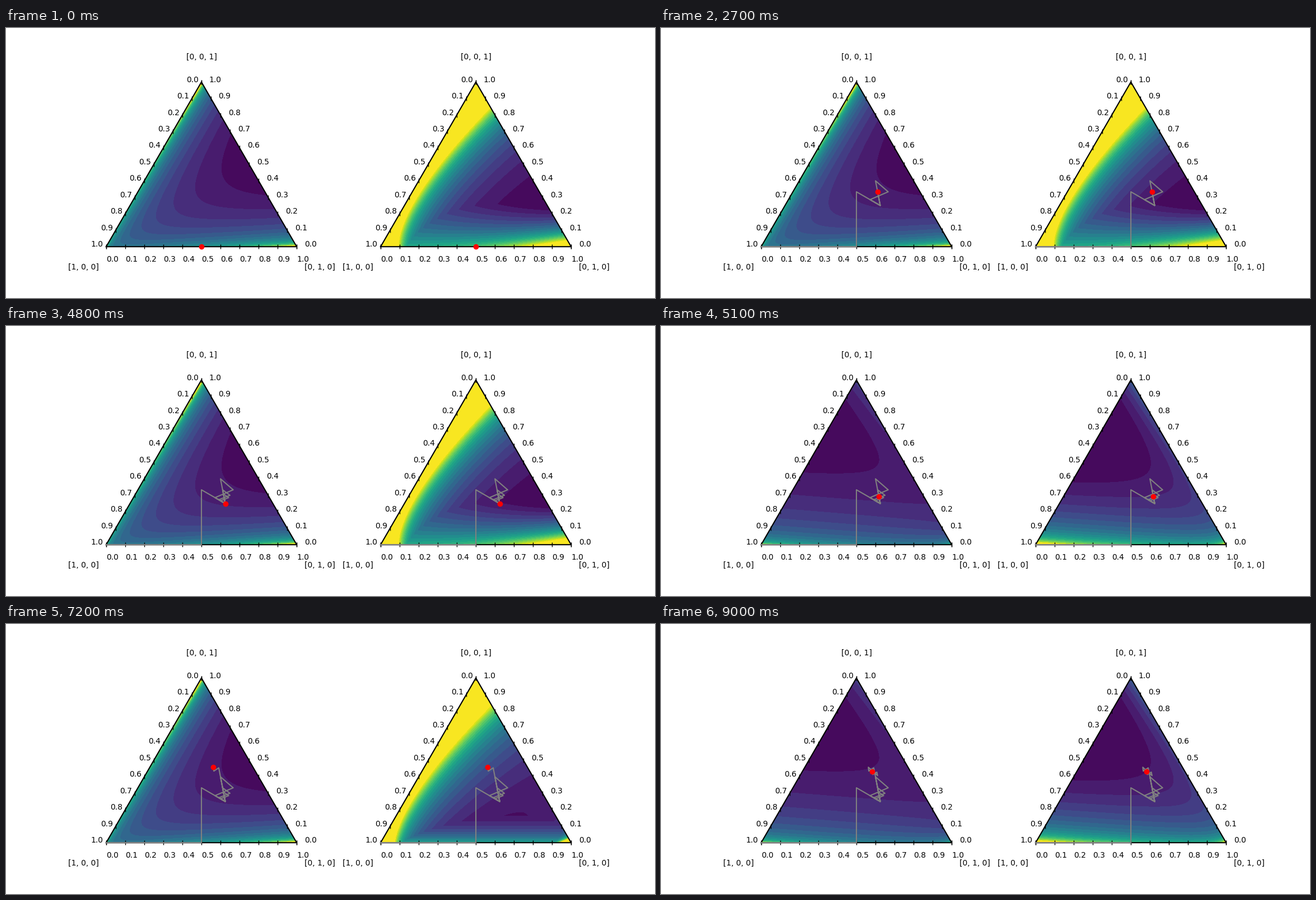
A matplotlib script that plays this animation: 1159x483 px, repeating every 9.3 s.

```python
import numpy as np
import matplotlib.pyplot as plt
from matplotlib.animation import FuncAnimation
from matplotlib.patches import Polygon

W, H, DPI = 1159, 483, 100
SIDE = 340.25
TOP, BASE = 96.6, 391.2
CENTERS = (349.0, 839.1)
STEPS = "ABCBCBABCBABCBABCCCCCCACBBBCAC"
N = len(STEPS) + 1
# Scene shown after each step, as runs of (scene, length).
RUNS = [(0, 14), (1, 1), (0, 2), (1, 7), (2, 2), (3, 1), (1, 4)]
SCENE_AT = [s for s, n in RUNS for _ in range(n)]

fig = plt.figure(figsize=(W / DPI, H / DPI), dpi=DPI, facecolor="white")
ax = fig.add_axes([0, 0, 1, 1])
ax.set_xlim(0, W)
ax.set_ylim(H, 0)
ax.axis("off")


def to_xy(w, cx):
    """Barycentric weights (a, b, c) to stage pixels."""
    w = np.asarray(w, float)
    x = cx + SIDE * (w[..., 1] + w[..., 2] / 2 - 0.5)
    y = BASE - (BASE - TOP) * w[..., 2]
    return x, y


# Averages of the vertices played so far, starting from an even A/B mix.
plays = np.eye(3)[["ABC".index(s) for s in STEPS]]
means = np.cumsum(plays, axis=0) / np.arange(1, N)[:, None]
path = np.vstack([[0.5, 0.5, 0], means])


# Scalar fields on the simplex, scaled so the colour range is 0 to 1.
def variance(w, num, den):
    """Linear form over the determinant of a weighted 2D design."""
    a, b, c = w
    top = num[0] * a + num[1] * b + num[2] * c
    ab, bc, ac, cc = den
    return (top + 1e-9) / (ab * a * b + bc * b * c + ac * a * c + cc * c * c + 1e-9)


def log_field(num, den, gain, shift):
    return lambda *w: gain * np.log(variance(w, num, den)) + shift


def max_field(num, shift, low):
    den = (0.35, 1, 0.22, 0)
    return lambda *w: np.maximum(0.2 * variance(w, num, den) + shift, low(*w))


def low_tilted(a, b, c):
    return 0.3 / (c + 0.2 * a + 0.12) - 0.63 * b - 0.345


def low_level(a, b, c):
    return 0.086 / (c + 0.1) - 0.28


edge_min = log_field((0.01, 1, 1), (0.07, 1, 0.03, 0), 0.25, -0.3355)
edge_min_sharp = log_field((0.01, 1, 1), (0.045, 1, 0.025, 0), 0.25, -0.3355)
SCENES = [
    (edge_min, max_field((0.2, 0.2, 1), -0.395, low_tilted)),
    (log_field((1, 0.07, 0.3), (0.073, 0.17, 1, 0.05), 0.17, -0.12),
     log_field((1, 0.07, 0.36), (0.073, 0.13, 1, 0.05), 0.28, -0.27)),
    (edge_min, max_field((0.15, 0.12, 1), -0.3, low_level)),
    (edge_min_sharp, None),
]

cmap = plt.get_cmap("viridis")
levels = np.linspace(0, 1, 21)
bands = cmap(np.linspace(0.025, 0.99, 20))


def paint(field, cx):
    corners = np.column_stack(to_xy(np.eye(3), cx))
    if field is None:
        return ax.add_patch(Polygon(corners, fc=cmap(0.25), ec="none", zorder=1))
    xs = np.linspace(cx - SIDE / 2, cx + SIDE / 2, 480)
    ys = np.linspace(TOP, BASE, 420)
    X, Y = np.meshgrid(xs, ys)
    c = (BASE - Y) / (BASE - TOP)
    # Cells outside the triangle are clipped, so only keep them finite.
    b = np.maximum((X - cx) / SIDE + 0.5 - c / 2, 0)
    a = np.maximum(1 - b - c, 0)
    z = np.clip(field(a, b, c), 0.001, 0.999)
    art = ax.contourf(X, Y, z, levels=levels, colors=bands, zorder=1)
    art.set_clip_path(Polygon(corners, transform=ax.transData))
    return art


def label(x, y, dx, dy, s):
    """Text with its baseline start offset in units of the side."""
    ax.text(x + dx * SIDE, y + dy * SIDE, s, fontsize=10)


def frame_axes(cx):
    corners = np.eye(3)
    x, y = to_xy(corners[[0, 1, 2, 0]], cx)
    ax.plot(x, y, color="black", lw=1.5, zorder=2)
    t = np.linspace(0, 1, 11)
    o = np.zeros(11)
    sides = [
        (np.stack([1 - t, t, o], -1), 0, 0.08),
        (np.stack([t, o, 1 - t], -1), -0.08, 0),
        (np.stack([o, 1 - t, t], -1), 0.04, 0),
    ]
    for w, dx, dy in sides:
        px, py = to_xy(w, cx)
        ax.plot(px, py, "|", color="black", ms=6, zorder=2)
        for u, v, s in zip(px, py, t):
            label(u, v, dx, dy, f"{s:.1f}")
    label(x[0], y[0], -0.2, 0.12, "[1, 0, 0]")
    label(x[1], y[1], 0.04, 0.12, "[0, 1, 0]")
    label(x[2], y[2], -0.08, -0.12, "[0, 0, 1]")


layers = [[paint(f, cx) for f, cx in zip(pair, CENTERS)] for pair in SCENES]
trails, dots = [], []
for cx in CENTERS:
    frame_axes(cx)
    trails += ax.plot([], [], color="gray", lw=1.5, zorder=3)
    dots += ax.plot([], [], "o", color="red", ms=6, zorder=4)


def update(i):
    for k, pair in enumerate(layers):
        for art in pair:
            art.set_visible(k == SCENE_AT[i])
    for cx, trail, dot in zip(CENTERS, trails, dots):
        x, y = to_xy(path[:i + 1], cx)
        trail.set_data(x, y)
        dot.set_data(x[-1:], y[-1:])
    return trails + dots


ani = FuncAnimation(fig, update, frames=N, interval=300, repeat=True,
                    repeat_delay=0, blit=False)
plt.show()
```
